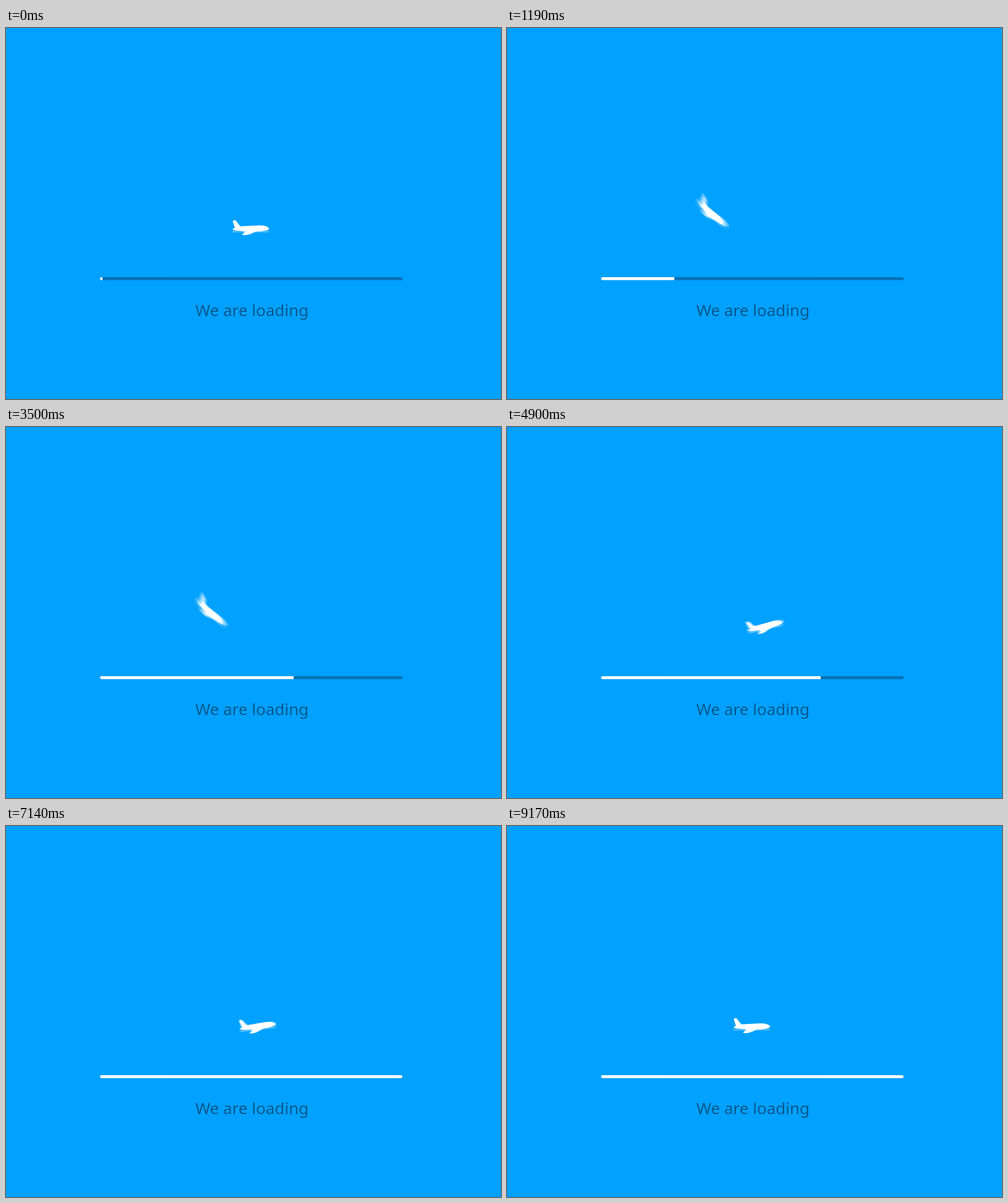
An HTML page with a canvas that plays this animation: 800x600 px, repeating every 9240 ms.

```html
<!DOCTYPE html>
<html lang="en">
<head>
<meta charset="utf-8">
<title>We are loading</title>
<style>
  html, body { margin: 0; width: 100%; height: 100%; overflow: hidden; background: #00a1ff; }
  svg, canvas { position: absolute; left: 0; top: 0; width: 800px; height: 600px; }
  text { font: 26px "Noto Sans", "Open Sans", sans-serif; fill: #07598d; text-anchor: middle; }
</style>
</head>
<body>
<svg viewBox="0 0 800 600">
  <clipPath id="track"><rect x="152" y="403" width="489" height="4.8" rx="2.4"/></clipPath>
  <g clip-path="url(#track)">
    <rect x="152" y="403" width="489" height="5" fill="#0571b3"/>
    <rect id="bar" x="152" y="403" width="4" height="5" fill="#fff"/>
  </g>
  <text x="397.5" y="466">We are loading</text>
</svg>
<canvas id="sky" width="800" height="600"></canvas>
<script>
const LOOP = 9240, STEP = 70, FLIGHT = 2310;
const SAMPLES = 16, SHUTTER = 35;
const PIVOT = { x: 395.5, y: 228 };

// [ms, right edge of the bar]
const progress = [[0, 156], [3080, 452.2], [5650, 529.5], [7147, 641], [LOOP, 641]];

// [ms, degrees flown around the circle]
const flight = [
  [0, 0], [140, 3], [280, 13], [420, 37], [560, 74], [630, 98], [770, 156], [910, 217],
  [980, 248], [1050, 275], [1120, 298.5], [1190, 318.5], [1260, 333], [1400, 348],
  [1610, 355.5], [1890, 359.4], [FLIGHT, 360]
];

const plane = new Path2D(
  "M366.6 313 Q366.8 310.8 369 310.8 Q371 310.8 372 312.2 L378.6 320.8 L408 319.3" +
  "C417 319 425 321 425 325 C424.5 328 412 328.6 403 329.2" +
  "Q393 334.8 387 335 L383 335 Q380.5 334.6 383 332.6 L387.5 328.8" +
  "L371 327.6 Q366.5 327.4 366.6 325 Q367 323.8 370 323.6 Z");
const underside = new Path2D("M366 328.5 H425 V330.5 H366 Z");

const bar = document.getElementById("bar");
const ctx = document.getElementById("sky").getContext("2d");

function segment(points, t) {
  let i = 0;
  while (i < points.length - 2 && t >= points[i + 1][0]) i++;
  return i;
}

function linear(points, t) {
  const i = segment(points, t);
  const [t0, v0] = points[i], [t1, v1] = points[i + 1];
  return v0 + (v1 - v0) * (t - t0) / (t1 - t0);
}

function slope(points, i) {
  if (i === 0 || i === points.length - 1) return 0;
  const [t0, v0] = points[i - 1], [t1, v1] = points[i + 1];
  return (v1 - v0) / (t1 - t0);
}

function smooth(points, t) {
  const i = segment(points, t);
  const [t0, v0] = points[i], [t1, v1] = points[i + 1];
  const h = t1 - t0, u = (t - t0) / h, w = 1 - u;
  return v0 * (1 + 2 * u) * w * w + v1 * u * u * (3 - 2 * u) +
    h * u * w * (slope(points, i) * w - slope(points, i + 1) * u);
}

function drawPlane(degrees) {
  ctx.save();
  ctx.translate(PIVOT.x, PIVOT.y);
  ctx.rotate(-degrees * Math.PI / 180);
  ctx.translate(-PIVOT.x, -PIVOT.y);
  ctx.globalAlpha = 0.35 / SAMPLES;
  ctx.fill(underside);
  ctx.globalAlpha = 1 / SAMPLES;
  ctx.fill(plane);
  ctx.restore();
}

function render(t) {
  bar.setAttribute("width", linear(progress, t) - 152);
  ctx.clearRect(0, 0, 800, 600);
  ctx.fillStyle = "#fff";
  ctx.globalCompositeOperation = "lighter";
  // Motion blur: average several poses within the open shutter.
  for (let i = 0; i < SAMPLES; i++) {
    const at = t % FLIGHT + SHUTTER * ((i + 0.5) / SAMPLES - 0.5);
    drawPlane(smooth(flight, Math.min(FLIGHT, Math.max(0, at))));
  }
}

const start = performance.now();
function tick() {
  const t = (performance.now() - start) % LOOP;
  render(Math.floor(t / STEP) * STEP);
  requestAnimationFrame(tick);
}
tick();
</script>
</body>
</html>
```
